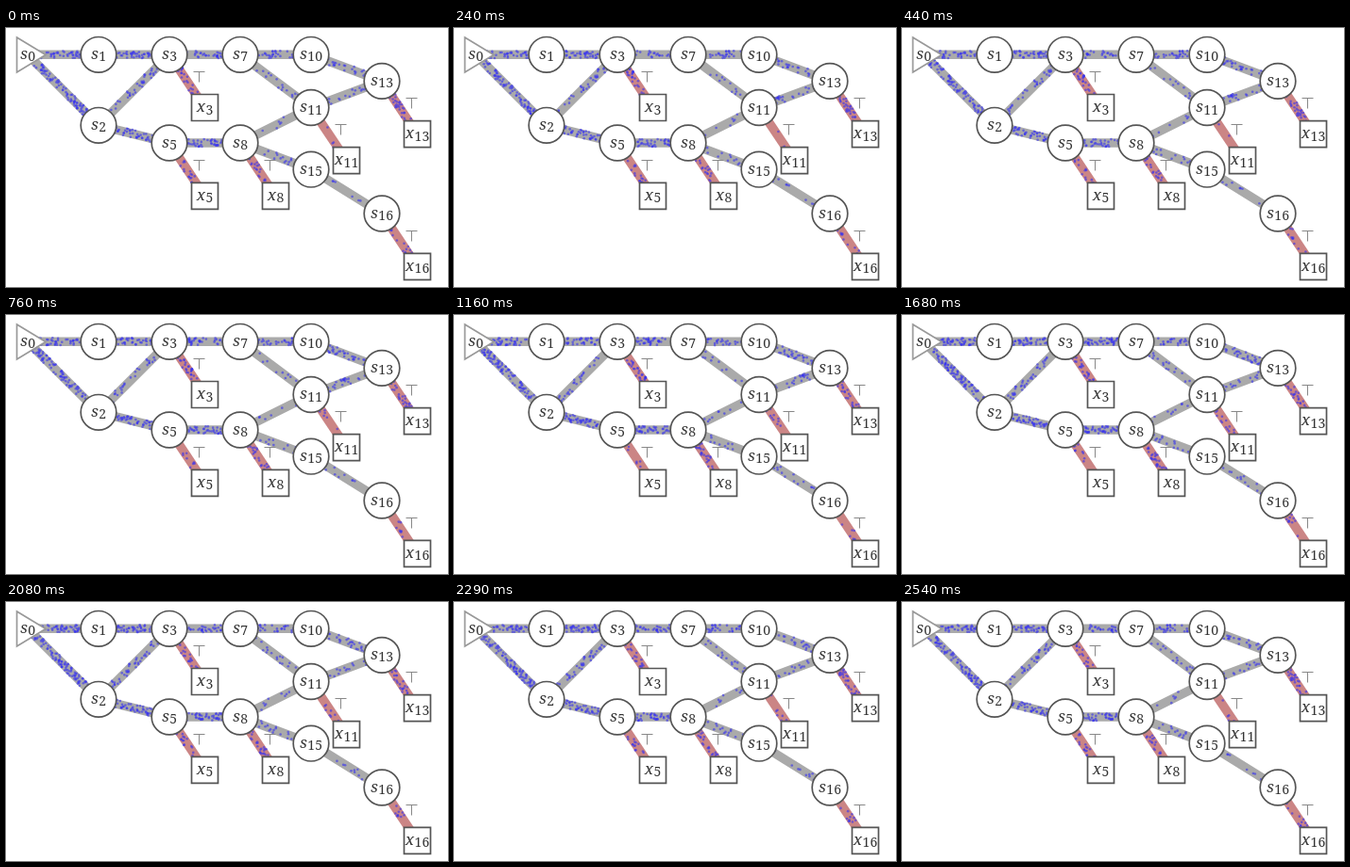
Write an HTML page with a canvas that moves like this. It is 468x275 px and loops after 2590 ms.

```html
<!DOCTYPE html>
<html>
<head>
<meta charset="utf-8">
<style>
html, body { margin: 0; overflow: hidden; background: #fff; }
canvas { display: block; }
</style>
</head>
<body>
<canvas id="stage" width="468" height="275"></canvas>
<script>
const ctx = document.getElementById('stage').getContext('2d');
const LOOP = 2590, STEPS = 51;

const nodes = {
  s0: [23, 28.3], s1: [98, 28.3], s2: [98, 103.3], s3: [173, 28.3],
  s5: [173, 122], s7: [248, 28.3], s8: [248, 122], s10: [323, 28.3],
  s11: [323, 84.5], s13: [398, 56.4], s15: [323, 150.2], s16: [398, 197],
  x3: [210.5, 84.5], x5: [210.5, 178.3], x8: [285.5, 178.3],
  x11: [360.5, 140.7], x13: [435.5, 112.6], x16: [435.5, 253.3]
};

// from, to, number of particles
const edges = `s0 s1 75,s0 s2 115,s1 s3 75,s2 s3 50,s2 s5 80,s3 s7 65,s5 s8 75,
s7 s10 50,s7 s11 22,s8 s11 14,s8 s15 24,s10 s13 50,s11 s13 32,s15 s16 16,
s3 x3 48,s5 x5 24,s8 x8 46,s11 x11 16,s13 x13 50,s16 x16 20`
  .split(',').map(line => {
    const [from, to, count] = line.trim().split(' ');
    return { a: nodes[from], b: nodes[to], exit: to[0] === 'x', count: +count };
  });

let seed = 7;
const random = () => (seed = seed * 16807 % 2147483647) / 2147483647;
for (const e of edges) {
  e.dots = Array.from({ length: e.count }, () => [random(), (random() - 0.5) * 8]);
}

function drawEdge({ a, b, exit }) {
  ctx.strokeStyle = exit ? '#cb8585' : '#aaa';
  ctx.lineWidth = 9.6;
  ctx.beginPath();
  ctx.moveTo(...a);
  ctx.lineTo(...b);
  ctx.stroke();
}

function drawDots({ a, b, dots }, phase) {
  const dx = b[0] - a[0], dy = b[1] - a[1], len = Math.hypot(dx, dy);
  ctx.fillStyle = 'rgba(55,50,240,.6)';
  for (const [start, side] of dots) {
    const p = (start + phase) % 1;
    ctx.beginPath();
    ctx.arc(a[0] + dx * p - dy / len * side, a[1] + dy * p + dx / len * side, 1.3, 0, 7);
    ctx.fill();
  }
}

function drawLabel(name, x, y) {
  const letter = name[0], index = name.slice(1);
  const main = 'italic 17px "Noto Serif", serif';
  const sub = '14px "Noto Serif", serif';
  ctx.fillStyle = '#333';
  ctx.font = main;
  const w = ctx.measureText(letter).width + 0.5;
  ctx.font = sub;
  const left = x - (w + ctx.measureText(index).width) / 2;
  ctx.fillText(index, left + w, y + 7);
  ctx.font = main;
  ctx.fillText(letter, left, y + 4.5);
}

function drawNode(name) {
  const [x, y] = nodes[name];
  ctx.fillStyle = '#fff';
  ctx.strokeStyle = name === 's0' ? '#999' : '#555';
  ctx.lineWidth = 1.7;
  ctx.beginPath();
  if (name === 's0') {
    ctx.moveTo(11.5, 10);
    ctx.lineTo(42, 28.5);
    ctx.lineTo(11.5, 47);
    ctx.closePath();
  } else if (name[0] === 's') {
    ctx.arc(x, y, 18.8, 0, 7);
  } else {
    ctx.rect(x - 14, y - 14, 28, 28);
  }
  ctx.fill();
  ctx.stroke();
  drawLabel(name, x, y);
}

function drawTop([x, y]) {
  const cx = Math.floor(x - 6) + 0.5, top = Math.floor(y - 38) + 0.5;
  ctx.strokeStyle = '#888';
  ctx.lineWidth = 1;
  ctx.beginPath();
  ctx.moveTo(cx - 6, top);
  ctx.lineTo(cx + 6, top);
  ctx.moveTo(cx, top);
  ctx.lineTo(cx, top + 11);
  ctx.stroke();
}

function draw(now) {
  const phase = Math.floor(now % LOOP / LOOP * STEPS) / STEPS;
  ctx.fillStyle = '#fff';
  ctx.fillRect(0, 0, 468, 275);
  edges.forEach(drawEdge);
  edges.forEach(e => drawDots(e, phase));
  edges.filter(e => e.exit).forEach(e => drawTop(e.b));
  Object.keys(nodes).forEach(drawNode);
  requestAnimationFrame(draw);
}
draw(performance.now());
</script>
</body>
</html>
```
